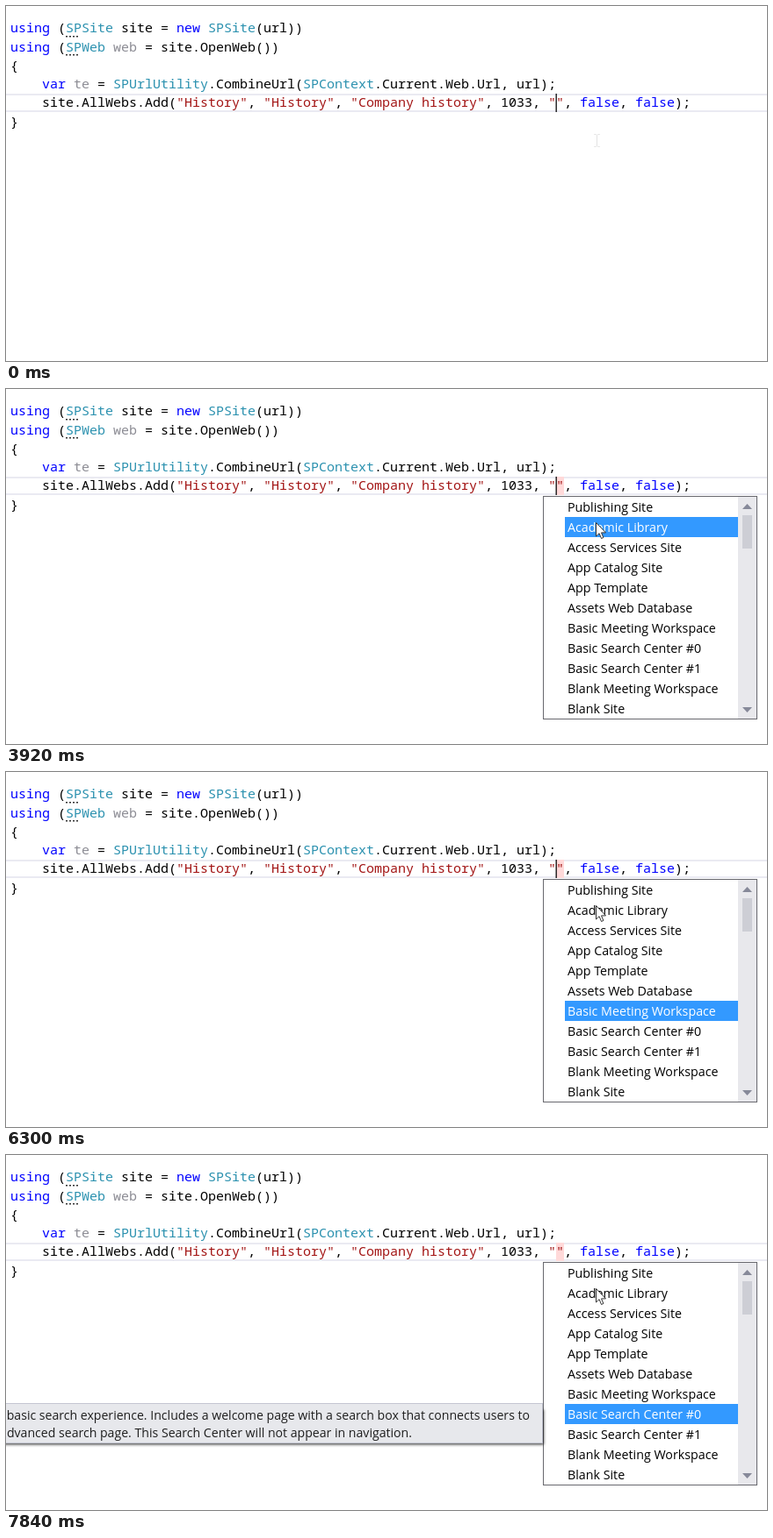
An HTML page with a canvas for the animation above (8 s loop, 866 by 405 pixels).

```html
<!DOCTYPE html>
<html lang="en">
<head>
<meta charset="utf-8">
<title>Code completion</title>
<style>
html, body { margin: 0; width: 100%; height: 100%; overflow: hidden; background: #fff; }
canvas { display: block; }
</style>
</head>
<body>
<canvas id="stage" width="866" height="405"></canvas>
<script>
const ctx = document.getElementById('stage').getContext('2d');
const LOOP = 8000;
const CODE_FONT = '15px "Noto Sans Mono", monospace';
const LIST_FONT = '14.25px "Open Sans", sans-serif';
const TIP_FONT = '14.1px "Open Sans", sans-serif';
const COLORS = { k: '#0000ff', t: '#2b91af', s: '#a31515', g: '#8c8c94', p: '#000' };
const CHAR = 9;

// Each line: indent in characters, then pairs of colour key and text.
const code = [
  [0, 'k', 'using ', 'p', '(', 't', 'SPSite', 'p', ' site = ', 'k', 'new ', 't', 'SPSite', 'p', '(url))'],
  [0, 'k', 'using ', 'p', '(', 't', 'SPWeb', 'g', ' web', 'p', ' = site.OpenWeb())'],
  [0, 'p', '{'],
  [4, 'k', 'var', 'g', ' te', 'p', ' = ', 't', 'SPUrlUtility', 'p', '.CombineUrl(', 't', 'SPContext',
    'p', '.Current.Web.Url, url);'],
  [4, 'p', 'site.AllWebs.Add(', 's', '"History"', 'p', ', ', 's', '"History"', 'p', ', ',
    's', '"Company history"', 'p', ', 1033, ', 's', '""', 'p', ', ', 'k', 'false', 'p', ', ',
    'k', 'false', 'p', ');'],
  [0, 'p', '}']
];

const items = ['Publishing Site', 'Academic Library', 'Access Services Site', 'App Catalog Site',
  'App Template', 'Assets Web Database', 'Basic Meeting Workspace', 'Basic Search Center #0',
  'Basic Search Center #1', 'Blank Meeting Workspace', 'Blank Site'];
const LIST = { x: 611, y: 122, w: 244, h: 255, row: 23, open: 3150, ready: 3220 };

const blinks = [70, 490, 1470, 1960, 2380, 2870, 3360, 3780, 4270, 4410, 4760, 5250, 5740,
  6230, 6720, 6790, 7140, 7350, 7630];
const picks = [[3780, 0], [3920, 1], [4060, 2], [4200, 3], [4410, 4], [4550, 5],
  [6300, 6], [6440, 7], [6650, 8], [7350, 7]];

const tips = [
  { from: 3710, ready: 3780, to: 3920, x: -205, y: 122, w: 816, lines: [
    'A blank site for expanding your Web site and quickly publishing Web pages. Contributors can work on draft',
    'versions of pages and publish them to make them visible to readers. The site includes document',
    'and image libraries for storing Web publishing assets.'] },
  { from: 4970, ready: 5040, to: 6300, x: 855, y: 238, w: 400, lines: ['Create an assets database'] },
  { from: 7210, ready: 7280, to: 7350, x: -205, y: 306, w: 816, lines: [
    'A site focused on delivering a search experience. The welcome page includes a search box with two tabs:',
    'one for general searches, and another for searches for information about people. You can add',
    'and customize tabs to focus on other search scopes or result types.'] },
  { from: 7840, ready: 7840, to: 8000, x: -205, y: 283, w: 816, ends: [596, 462], lines: [
    'basic search experience. Includes a welcome page with a search box that connects users to',
    'advanced search page. This Search Center will not appear in navigation.'] }
];

function rect(x, y, w, h, color) {
  ctx.fillStyle = color;
  ctx.fillRect(x, y, w, h);
}

function frame(x, y, w, h, color) {
  ctx.strokeStyle = color;
  ctx.lineWidth = 1;
  ctx.strokeRect(x + 0.5, y + 0.5, w - 1, h - 1);
}

function poly(points, color) {
  ctx.beginPath();
  points.forEach(([x, y]) => ctx.lineTo(x, y));
  ctx.closePath();
  ctx.fillStyle = color;
  ctx.fill();
}

function text(str, x, y, color) {
  ctx.fillStyle = color;
  ctx.fillText(str, x, y);
}

function drawCode(marked) {
  rect(0, 100, 866, 2, '#eaeaf2');
  rect(0, 119, 866, 2, '#eaeaf2');
  if (marked) rect(626, 100, 9, 21, '#ffd9d9');
  ctx.font = CODE_FONT;
  code.forEach(([indent, ...runs], row) => {
    let x = 5 + indent * CHAR;
    for (let i = 0; i < runs.length; i += 2) {
      text(runs[i + 1], x, Math.round(30.2 + 21.3 * row), COLORS[runs[i]]);
      x += runs[i + 1].length * CHAR;
    }
  });
  for (let x = 68; x < 84; x += 4) {
    rect(x, 34, 2, 1.5, '#333');
    rect(x, 55, 2, 1.5, '#333');
  }
}

function drawCaret() {
  rect(625, 100, 1, 21, 'rgba(0,0,0,.45)');
  rect(626, 100, 1, 21, 'rgba(0,0,0,.8)');
}

function drawIBeam() {
  rect(672, 147, 1, 13, '#e2e2e2');
  rect(669, 146, 3, 1, '#e8e8e8');
  rect(673, 146, 3, 1, '#e8e8e8');
  rect(669, 160, 3, 1, '#e8e8e8');
  rect(673, 160, 3, 1, '#e8e8e8');
}

function drawArrow() {
  const shape = [[0, 0], [0, 15.5], [3.6, 12.2], [6, 18], [8.4, 17], [6, 11.4], [11, 11.4]];
  poly(shape.map(([x, y]) => [x + 671.5, y + 152.5]), '#fff');
  ctx.strokeStyle = '#333';
  ctx.lineWidth = 1;
  ctx.stroke();
}

function drawList(t) {
  const { x, y, w, h, row } = LIST;
  rect(x, y, w, h, '#fff');
  if (t >= LIST.ready) {
    const pick = picks.filter(p => p[0] <= t).pop();
    const chosen = pick ? pick[1] : -1;
    ctx.font = LIST_FONT;
    items.forEach((name, i) => {
      const top = y + 1 + i * row;
      if (i === chosen) rect(636, top, 197, row, '#3399ff');
      text(name, 639, top + 17, i === chosen ? '#fff' : '#000');
    });
    if (!pick) frame(636, y + 1, 197, row, '#3399ff');
    rect(833, y + 1, 21, h - 2, '#e8e8ec');
    rect(838, 144, 11, 38, '#cdced5');
    poly([[838, 137], [843.5, 131], [849, 137]], '#868999');
    poly([[838, 363], [849, 363], [843.5, 369]], '#868999');
  }
  frame(x, y, w, h, '#68686e');
}

function drawTip(tip, t) {
  const { x, y, w, lines, ends } = tip;
  const h = 6 + 20 * lines.length;
  // The drop shadow lies outside the box only.
  ctx.save();
  ctx.beginPath();
  ctx.rect(-300, 0, 1600, 405);
  ctx.rect(x, y, w, h);
  ctx.clip('evenodd');
  ctx.shadowColor = 'rgba(0,0,0,.7)';
  ctx.shadowBlur = 3;
  ctx.shadowOffsetX = 1;
  ctx.shadowOffsetY = 1.5;
  rect(x + 5, y + 5, w - 5, h - 5, '#000');
  ctx.restore();
  if (t < tip.ready) return;

  rect(x, y, w, h, '#e7e8ec');
  frame(x, y, w, h, '#c4c6d2');
  ctx.font = TIP_FONT;
  ctx.textAlign = ends ? 'right' : 'left';
  lines.forEach((line, i) => text(line, ends ? ends[i] : x + 4, y + 19 + 20 * i, '#1e1e1e'));
  ctx.textAlign = 'left';
}

function draw(t) {
  const open = t >= LIST.open;
  rect(0, 0, 866, 405, '#fff');
  drawCode(open);
  if (blinks.filter(b => b <= t).length % 2 === 0) drawCaret();
  if (open) drawList(t);
  tips.filter(tip => t >= tip.from && t < tip.to).forEach(tip => drawTip(tip, t));
  if (open) drawArrow();
  else drawIBeam();
}

const start = performance.now();
function tick() {
  draw((performance.now() - start) % LOOP);
  requestAnimationFrame(tick);
}
tick();
</script>
</body>
</html>
```
